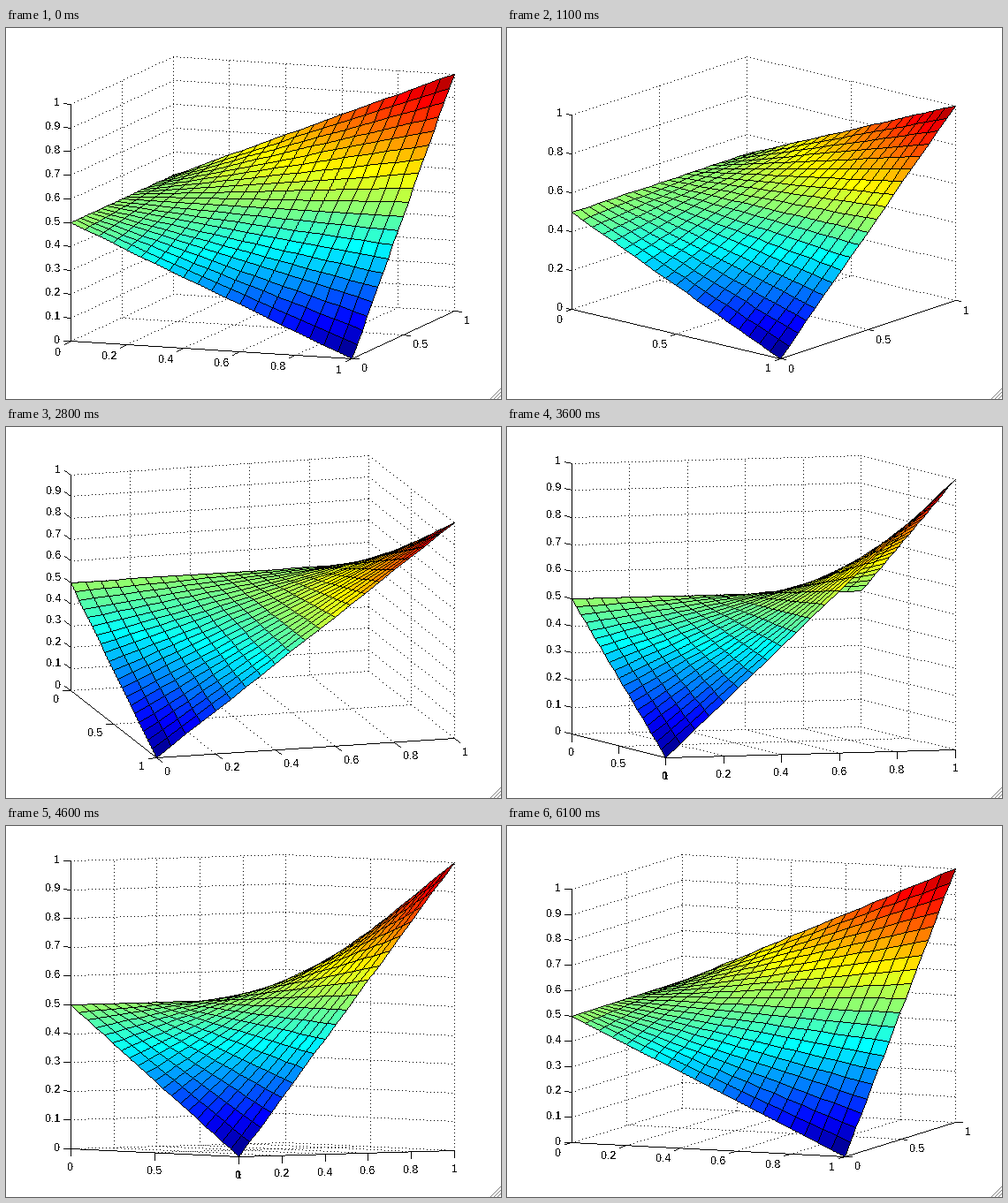
Animation, 560 px wide and 420 px high, one loop 6.2 s. Source, as a matplotlib script:

```python
import numpy as np
import matplotlib.pyplot as plt
from matplotlib.animation import FuncAnimation

plt.rcParams["font.family"] = "Liberation Sans"
plt.rcParams["text.antialiased"] = False

WIDTH, HEIGHT, DPI = 560, 420, 100
LEFT, RIGHT, TOP, BOTTOM = 72.8, 506.8, 32, 374
FRAMES, INTERVAL = 62, 100
CELLS = 20
TICK_RATIO = 0.025  # tick length relative to the longest axis
DOT_STEP = 4
FONT_PX = 12.5
BLACK, GRAY = (0, 0, 0), (0.5, 0.5, 0.5)
HELD = {1: 2, 22: 21, 50: 49}  # frames that repeat a neighbour's view


def jet(z):
    """64-step jet colour for heights in 0..1."""
    k = np.minimum(np.floor(z * 64 + 1e-9), 63) + 1
    ramp = lambda k: np.clip(np.minimum(k - 8, 56 - k) / 16, 0, 1)
    return np.stack([ramp(k - 16), ramp(k), ramp(k + 16)], axis=-1)


def build_surface():
    grid = np.linspace(0, 1, CELLS + 1)
    x, y = np.meshgrid(grid, grid, indexing="ij")
    points = np.stack([x, y, 0.5 + x * (y - 0.5)], axis=-1)
    corners = [points[:-1, :-1], points[1:, :-1], points[1:, 1:], points[:-1, 1:]]
    quads = np.stack(corners, axis=2).reshape(-1, 4, 3)
    return quads, jet(quads[:, 0, 2])


def view_angles(n):
    """Azimuth sweeps 20-80 degrees and back; elevation follows an ellipse."""
    n = HELD.get(n, n) or FRAMES
    rising = n <= FRAMES // 2
    az = 18 + 2 * n if rising else 20 + 2 * (FRAMES - n)
    arc = 10 * np.sqrt(max(0, 1 - ((az - 50) / 30) ** 2))
    return np.radians(az), np.radians(12 + arc if rising else 12 - arc)


class View:
    """Orthographic view stretched to fill the plot box."""

    def __init__(self, az, el):
        self.s, self.c, self.t = np.sin(az), np.cos(az), np.tan(el)
        self.flat = el < np.radians(6.5)
        self.toward = np.array([self.s, -self.c, self.t])
        self.x_len = (RIGHT - LEFT) * self.c / (self.s + self.c)
        self.y_len = (RIGHT - LEFT) - self.x_len
        self.z_len = (BOTTOM - TOP) / (1 + self.t * (self.s + self.c))
        axes = self(np.eye(3)) - self((0, 0, 0))
        lengths = np.hypot(*axes.T)
        self.directions = axes / lengths[:, None]
        self.tick = TICK_RATIO * lengths.max()

    def __call__(self, p):
        x, y, z = np.moveaxis(np.asarray(p, float), -1, 0)
        u = LEFT + self.x_len * x + self.y_len * y
        v = BOTTOM - self.z_len * (z + self.t * (self.s * (1 - x) + self.c * y))
        return np.stack([u, v], axis=-1)


def line_pixels(a, b, step=1):
    """One-pixel aliased lines between points a and b, which may be stacked."""
    a, b = np.round(a), np.round(b)
    length = np.maximum(np.abs(b - a).max(axis=-1), 1)
    k = np.arange(0, length.max() + 1, step)
    t = np.minimum(k / length[..., None], 1)[..., None]
    return np.round(a[..., None, :] + (b - a)[..., None, :] * t).astype(int)


def paint(canvas, pixels, color=BLACK):
    canvas[pixels[..., 1], pixels[..., 0]] = color


def fill(canvas, quad, color):
    """Even-odd fill, which also copes with folded cells."""
    (left, top), (right, bottom) = quad.min(axis=0), quad.max(axis=0)
    ys, xs = np.ogrid[top:bottom + 1, left:right + 1]
    inside = np.zeros((bottom - top + 1, right - left + 1), bool)
    for (x0, y0), (x1, y1) in zip(quad, np.roll(quad, -1, axis=0)):
        if y0 != y1:
            crosses = (y0 <= ys) != (y1 <= ys)
            inside ^= crosses & (xs < x0 + (ys - y0) * ((x1 - x0) / (y1 - y0)))
    canvas[top:bottom + 1, left:right + 1][inside] = color


def paint_surface(canvas, view):
    order = np.argsort(QUADS.mean(axis=1) @ view.toward, kind="stable")
    quads = np.round(view(QUADS[order])).astype(int)
    edges = line_pixels(quads, np.roll(quads, -1, axis=1))
    for quad, edge, color in zip(quads, edges, COLORS[order]):
        fill(canvas, quad, color)
        paint(canvas, edge)


def ticks(step):
    return np.arange(round(1 / step) + 1) * step


def grid_lines(xs, ys, zs):
    for x in xs:
        yield (x, 0, 0), (x, 1, 0)
        yield (x, 1, 0), (x, 1, 1)
    for y in ys:
        yield (0, y, 0), (1, y, 0)
        yield (0, y, 0), (0, y, 1)
    for z in zs:
        yield (0, 0, z), (0, 1, z)
        yield (0, 1, z), (1, 1, z)


def blank_stage():
    canvas = np.ones((HEIGHT, WIDTH, 3))
    right, bottom = WIDTH - 1, HEIGHT - 1
    for size in (11, 7, 3):  # window resize grip
        grip = line_pixels(np.array([right - size, bottom]),
                           np.array([right, bottom - size]))
        paint(canvas, grip, GRAY)
    return canvas


QUADS, COLORS = build_surface()
STAGE = blank_stage()

fig = plt.figure(figsize=(WIDTH / DPI, HEIGHT / DPI), dpi=DPI, facecolor="white")
ax = fig.add_axes([0, 0, 1, 1])
ax.axis("off")
picture = ax.imshow(STAGE, interpolation="nearest", aspect="auto")
labels = []


def add_label(value, x, y, align):
    labels.append(ax.text(round(x), round(y + 4.5), f"{value:g}", ha=align,
                          va="baseline", fontsize=FONT_PX * 72 / DPI))


def draw(n):
    view = View(*view_angles(n))
    canvas = STAGE.copy()
    while labels:
        labels.pop().remove()

    xs = ticks(0.2 if view.x_len > 240 else 0.5)
    ys = ticks(0.2 if view.y_len > 240 else 0.5)
    zs = ticks(0.1 if view.z_len > 235 else 0.2)

    for a, b in grid_lines(xs, ys, zs):
        paint(canvas, line_pixels(view(a), view(b), DOT_STEP))
    frame = view([(0, 0, 1), (0, 0, 0), (1, 0, 0), (1, 1, 0)])
    paint(canvas, line_pixels(frame[:-1], frame[1:]))

    def add_ticks(values, place, direction, gap, drop, align):
        for value in values:
            start = view(place(value))
            end = start + view.tick * direction
            paint(canvas, line_pixels(start, end))
            add_label(value, end[0] + gap, end[1] + drop, align)

    along_x, along_y, up = view.directions
    on_x, on_y = lambda v: (v, 0, 0), lambda v: (1, v, 0)
    add_ticks(zs, lambda v: (0, 0, v), -along_x, -4, -1.5, "right")
    if view.flat:
        add_ticks(xs, on_x, -up, 0, 12, "center")
        add_ticks(ys, on_y, -up, 0, 12, "center")
    else:
        add_ticks(xs, on_x, -along_y, -4, 9, "right")
        add_ticks(ys, on_y, along_x, 3, 10, "left")

    paint_surface(canvas, view)
    picture.set_data(canvas)
    return [picture, *labels]


anim = FuncAnimation(fig, draw, frames=FRAMES, interval=INTERVAL,
                     init_func=lambda: draw(0), repeat=True, repeat_delay=0,
                     blit=False, cache_frame_data=False)
plt.show()
```
